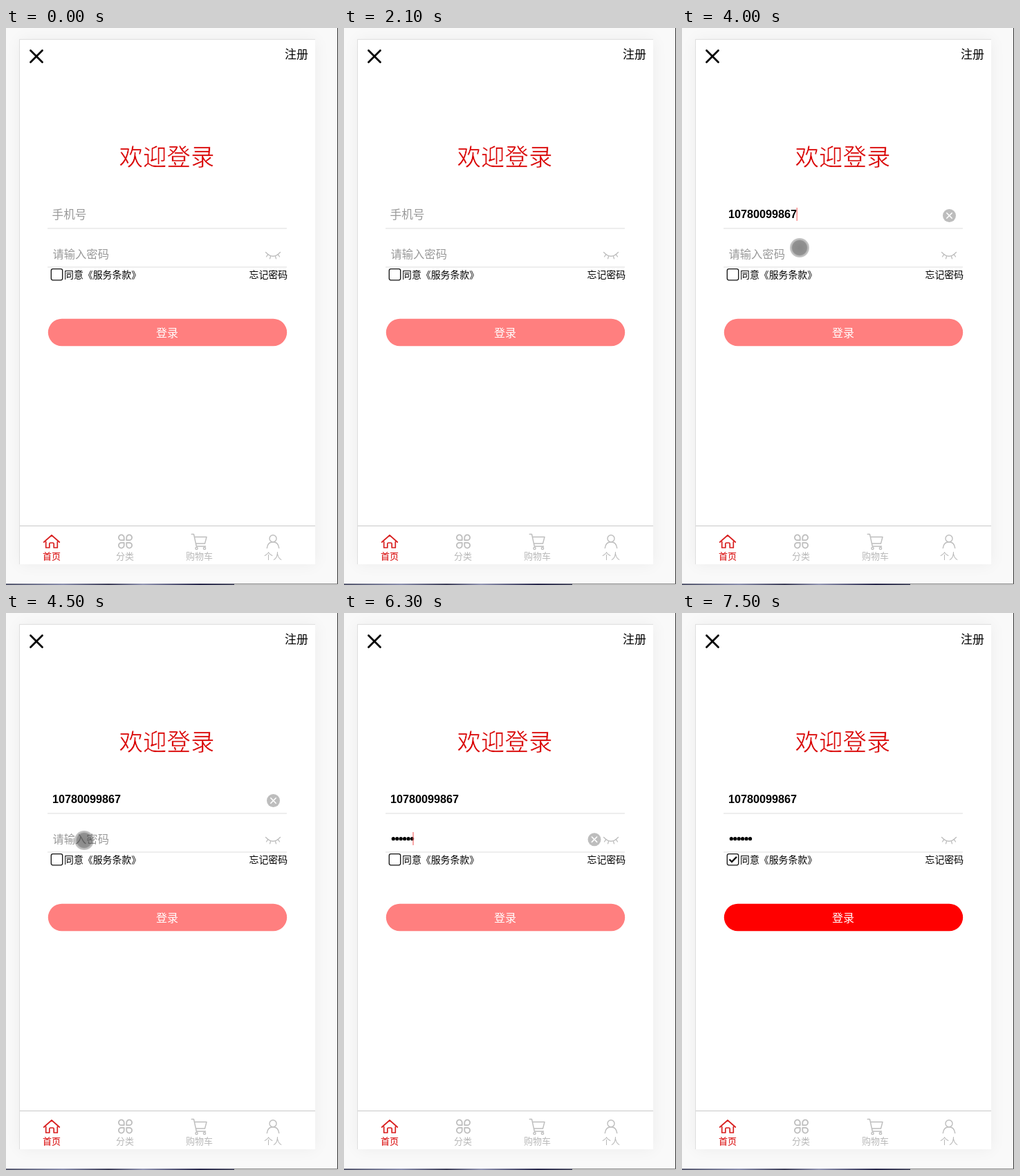
These frames come from a looping animation (480 by 806 pixels, 8000 ms). An HTML page:

```html
<!DOCTYPE html>
<html lang="zh">
<head>
<meta charset="utf-8">
<title>登录</title>
<style>
  html, body { margin: 0; width: 100%; height: 100%; overflow: hidden; background: #f9f9f9; }
  .panel { position: absolute; left: 20px; top: 17px; width: 427px; height: 759px; background: #fff;
    box-shadow: 0 0 22px rgba(0, 0, 0, .055); }
  svg { position: absolute; left: 0; top: 0; width: 480px; height: 806px; }
  text { font-family: "Noto Sans CJK SC", "Noto Sans CJK", sans-serif; font-weight: 300; }
  .title { font-size: 34.5px; fill: #d90000; stroke: #fff; stroke-width: .6; }
  .digits { font: bold 16.2px "Liberation Sans", Arial, sans-serif; }
  .hint { fill: #999; }
  .small { font-size: 13.9px; }
  .tab { font-size: 13px; fill: #b8b8b8; }
  .tab.on { fill: #d80000; }
  .line { fill: none; stroke: #bdbdbd; stroke-width: 1.4; stroke-linecap: round; stroke-linejoin: round; }
  .caret { fill: #f56c6c; }
</style>
</head>
<body>
<div class="panel"></div>
<svg viewBox="0 0 480 806">
  <defs>
    <radialGradient id="touchFill">
      <stop offset="0" stop-color="#333" stop-opacity=".58"/>
      <stop offset=".74" stop-color="#333" stop-opacity=".54"/>
      <stop offset=".84" stop-color="#333" stop-opacity=".34"/>
      <stop offset="1" stop-color="#333" stop-opacity=".27"/>
    </radialGradient>
    <linearGradient id="strip">
      <stop offset="0" stop-color="#55586e"/>
      <stop offset=".25" stop-color="#8b8fae"/>
      <stop offset=".45" stop-color="#3c3d58"/>
      <stop offset=".6" stop-color="#9396b4"/>
      <stop offset=".85" stop-color="#26264a"/>
      <stop offset="1" stop-color="#4d4f63"/>
    </linearGradient>
    <g id="clear">
      <circle r="9.5" fill="#bdbdbd"/>
      <path d="M-3.7-3.7 3.7 3.7M3.7-3.7-3.7 3.7" stroke="#fff" stroke-width="1.6" stroke-linecap="round"/>
    </g>
    <path id="petal" d="M-1.8-1.8H-5.7A3.9 3.9 0 1 1-1.8-5.7Z"/>
  </defs>

  <path d="M19.5 776V16.5H447" fill="none" stroke="#dedede"/>
  <rect x="479" width="1" height="806" fill="#333"/>
  <rect y="804" width="480" height="1" fill="#777"/>
  <rect y="805" width="480" height="1" fill="#e4e4e4"/>
  <rect y="804" width="330" height="2" fill="url(#strip)"/>

  <path d="M35.5 32.5 52.5 49.5M52.5 32.5 35.5 49.5" stroke="#000" stroke-width="2.8" stroke-linecap="round"/>
  <text x="403" y="44" font-size="17">注册</text>
  <text class="title" x="163.5" y="198.5">欢迎登录</text>

  <rect x="60" y="289" width="346" height="2" fill="#eee"/>
  <rect x="60" y="345" width="346" height="2" fill="#eee"/>
  <text id="phoneHint" class="hint" x="66.5" y="275.5" font-size="16.7">手机号</text>
  <text id="phone" class="digits" x="67" y="275"></text>
  <rect id="phoneCaret" class="caret" y="260" width="1.2" height="19"/>
  <use id="phoneClear" href="#clear" x="386.5" y="271.5"/>

  <text id="passHint" class="hint" x="67.5" y="332.5" font-size="16.3">请输入密码</text>
  <g id="dots"></g>
  <rect id="passCaret" class="caret" y="317" width="1.2" height="19"/>
  <use id="passClear" href="#clear" x="362" y="327.7"/>
  <path class="line" style="stroke-width:1.3" d="M375.5 324.5Q386 336 396.5 324.5M378.3 328.3 376.5 331M382.5 330.5 381.5 333.8M389.5 330.5 390.5 333.8M393.7 328.3 395.5 331"/>

  <rect x="65.3" y="348.6" width="16.4" height="16.2" rx="2.5" fill="none" stroke="#111" stroke-width="1.3"/>
  <path id="check" d="M68.5 356.5 72 360 79 352.8" fill="none" stroke="#111" stroke-width="2.4"/>
  <text class="small" x="84" y="362.2">同意《服务条款》</text>
  <text class="small" x="351.5" y="362.2">忘记密码</text>

  <rect id="button" x="60.8" y="420.7" width="345.4" height="39.6" rx="19.8"/>
  <text x="217" y="447.3" font-size="16" fill="#fff">登录</text>

  <rect x="20" y="720" width="427" height="1" fill="#c8c8c8"/>
  <path class="line" style="stroke:#d81e1e;stroke-width:1.7" d="M54.7 744 66 734 77.3 744M57.7 743.5V752H62.8V746.5Q62.8 745 64.3 745H67.7Q69.2 745 69.2 746.5V752H74.3V743.5"/>
  <g class="line" transform="translate(172.5 743)" style="stroke-width:1.8">
    <use href="#petal"/>
    <use href="#petal" transform="rotate(90)"/>
    <use href="#petal" transform="rotate(180)"/>
    <use href="#petal" transform="rotate(270)"/>
  </g>
  <g class="line">
    <path d="M268.3 732.5H271.5L275.3 750H288.5M272.5 736.5H290L287.5 746H274.5"/>
    <circle cx="275.5" cy="753" r="1.6"/>
    <circle cx="287" cy="753" r="1.6"/>
    <circle cx="386" cy="738.7" r="5"/>
    <path d="M377.3 752.5Q378.5 743.8 386 743.8T394.7 752.5"/>
  </g>
  <text class="tab on" x="53" y="768.7">首页</text>
  <text class="tab" x="159" y="768.7">分类</text>
  <text class="tab" x="260" y="768.7">购物车</text>
  <text class="tab" x="373" y="768.7">个人</text>

  <circle id="touch" r="14" fill="url(#touchFill)"/>
</svg>
<script>
  const LOOP = 8000, NUMBER = "10780099867";
  const $ = id => document.getElementById(id);
  const show = (id, on) => $(id).setAttribute("visibility", on ? "visible" : "hidden");

  // Each entry is [start time, x, y] and holds until the next; no position hides the circle.
  const touches = [
    [1400, 265, 700], [1500, 245, 520], [1600, 215, 340], [1700, 196, 261], [1800, 195, 283], [2100],
    [2700, 174, 313], [3700, 170, 318], [4200],
    [4400, 118, 316], [4500, 113, 329], [4700, 113, 336], [4800, 114, 342], [4900],
    [5900, 138, 347], [6300], [6900, 75, 362], [7200, 74.5, 361], [7300]
  ];
  const digitKeys = [2500, 2700, 3000, 3000, 3100, 3300, 3600, 3700, 3700, 3800, 4000];
  const dotKeys = [5400, 5500, 5900, 6100, 6200, 6200];

  const typed = (keys, t) => keys.filter(k => k <= t).length;
  const within = (t, ...spans) => spans.some(([a, b]) => t >= a && t < b);

  $("dots").innerHTML = dotKeys.map((_, i) =>
    `<circle cx="${71.3 + 5.45 * i}" cy="326.7" r="2.6"/>`).join("");
  const dots = [...$("dots").children];

  function draw(t) {
    const digits = typed(digitKeys, t), count = typed(dotKeys, t);

    $("phone").textContent = NUMBER.slice(0, digits);
    show("phoneHint", !digits);
    show("phoneClear", digits && t < 4700);
    show("phoneCaret", within(t, [2400, 4400]));
    $("phoneCaret").setAttribute("x", 66.6 + 9 * digits);

    dots.forEach((dot, i) => dot.setAttribute("visibility", i < count ? "visible" : "hidden"));
    show("passHint", !count);
    show("passClear", count && t < 7500);
    show("passCaret", within(t, [4700, 5100], [5400, 6700], [7200, 7300]));
    $("passCaret").setAttribute("x", count ? 66.4 + 5.5 * count : 67.4);

    const agreed = t >= 7300;
    show("check", agreed);
    $("button").setAttribute("fill", agreed ? "#ff0000" : "#ff7f7f");

    const [, x, y] = touches.filter(k => k[0] <= t).pop() || [];
    show("touch", x !== undefined);
    if (x !== undefined) $("touch").setAttribute("transform", `translate(${x} ${y})`);
  }

  const start = performance.now();
  function tick() {
    draw((performance.now() - start) % LOOP);
    requestAnimationFrame(tick);
  }
  tick();
</script>
</body>
</html>
```
